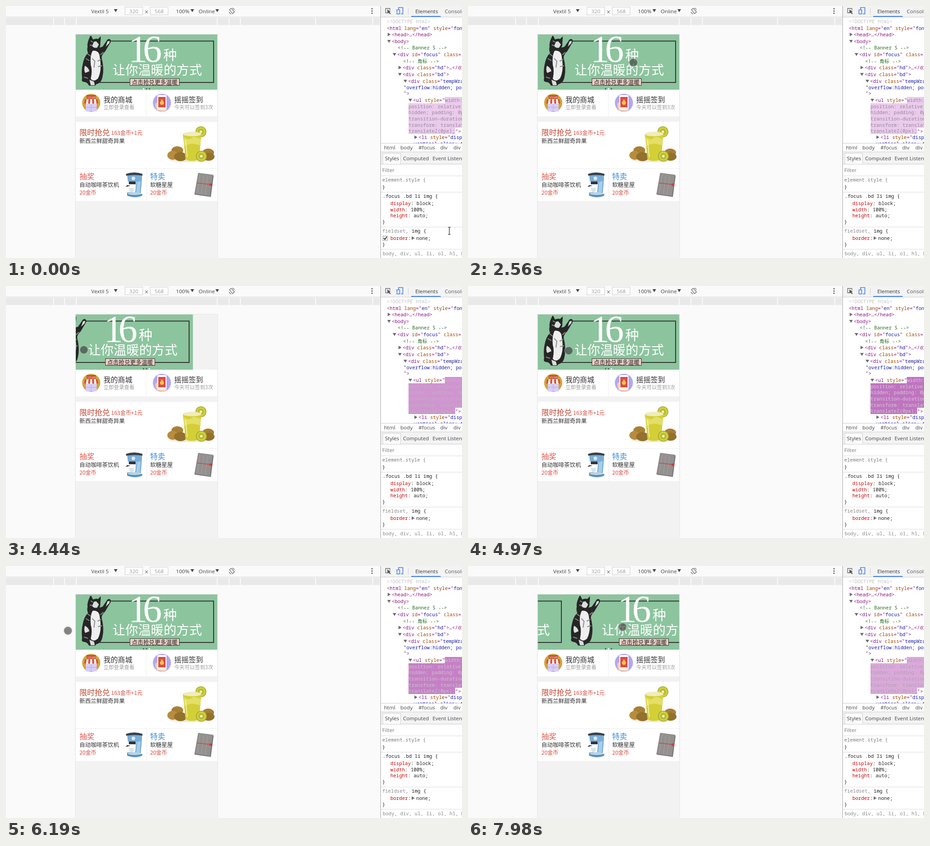
An HTML page that plays this animation: 1006 px wide and 557 px high, repeating every 8000 ms.

```html
<!DOCTYPE html>
<html lang="zh">
<head>
<meta charset="utf-8">
<title>Touch carousel in device mode</title>
<style>
html, body { margin: 0; width: 100%; height: 100%; overflow: hidden; background: #fafafa; }
svg { display: block; width: 100vw; height: 100vh; }
text { white-space: pre; }
.ui { font: 11.6px "Open Sans", "Noto Sans", sans-serif; }
.code { font: 10.7px "Noto Sans Mono", "Noto Sans CJK SC", monospace; }
.page { font-family: "Noto Sans CJK SC", "Noto Sans CJK", sans-serif; font-weight: 300; }
.val { fill: #1a1aa6; }
.attr { fill: #994500; }
</style>
</head>
<body>
<svg id="stage" viewBox="0 0 1006 557"></svg>
<script>
const esc = s => s.replace(/&/g, '&amp;').replace(/</g, '&lt;');
const rect = (x, y, w, h, fill, more = '') =>
  `<rect x="${x}" y="${y}" width="${w}" height="${h}" fill="${fill}" ${more}/>`;
const path = (d, fill, more = '') => `<path d="${d}" fill="${fill}" ${more}/>`;
const line = (d, color, width = 1) => path(d, 'none', `stroke="${color}" stroke-width="${width}"`);
const disc = (x, y, r, fill, more = '') => `<circle cx="${x}" cy="${y}" r="${r}" fill="${fill}" ${more}/>`;
const oval = (x, y, rx, ry, fill) => `<ellipse cx="${x}" cy="${y}" rx="${rx}" ry="${ry}" fill="${fill}"/>`;
const text = (cls, x, y, fill, s, more = '') =>
  `<text class="${cls}" x="${x}" y="${y}" fill="${fill}" ${more}>${esc(s)}</text>`;
const ui = (x, y, s, fill = '#444') => text('ui', x, y, fill, s);
const code = (x, y, s, fill = '#222', more) => text('code', x, y, fill, s, more);
const cn = (x, y, size, fill, s, more = '') => text('page', x, y, fill, s, `font-size="${size}" ${more}`);
const down = (x, y, fill = '#6e6e6e') => path(`M${x} ${y}h8l-4 6.5z`, fill);
const right = (x, y) => path(`M${x} ${y}v8l6.5 -4z`, '#6e6e6e');

// Markup line with coloured attribute names and values
const markup = (x, y, s) => {
  const body = esc(s).replace(/"([^"]*)("|$)| (\w+)(?==)/g, (m, value, end, name) =>
    name ? ` <tspan class="attr">${name}</tspan>` : `"<tspan class="val">${value}</tspan>${end}`);
  return `<text class="code" x="${x}" y="${y}" fill="#881280">${body}</text>`;
};
// CSS declaration
const rule = (y, name, value) =>
  `<text class="code" x="848" y="${y}" fill="#222"><tspan fill="#c80000">${name}</tspan>${value}</text>`;

function toolbar() {
  const cuts = [0, 106, 130, 156, 467, 493, 518, 684, 810, 827];
  return rect(0, 0, 826, 557, '#fafafa') + line('M0 24.5H826', '#d4d4d4') +
    cuts.slice(1).map((c, i) => rect(cuts[i], 26, c - cuts[i] - 2, 16, '#e9e9e9')).join('') +
    ui(188, 16, 'Vextil 5') + down(238, 7, '#444') +
    rect(262.5, 2.5, 39, 17, '#fff', 'stroke="#ccc"') + ui(272, 16, '320', '#999') +
    line('M307 10l6 6m0 -6l-6 6', '#555') +
    rect(318.5, 2.5, 39, 17, '#fff', 'stroke="#ccc"') + ui(328, 16, '568', '#999') +
    ui(375, 16, '100%') + down(407, 7, '#444') + ui(425, 16, 'Online') + down(462, 7, '#444') +
    line('M493 8l4 -3 7 8 -4 4zM492 13a6.5 6.5 0 0 0 5 4.500M499 4.500a6.500 6.500 0 0 1 5 4', '#666', 1.2) +
    [6, 11, 16].map(y => disc(807.500, y, 1.500, '#555')).join('');
}

function devtools() {
  return rect(826, 0, 180, 557, '#fff') + rect(826, 0, 180, 24, '#f3f3f3') + line('M826 24.5H1006', '#ccc') +
    line('M847 15H837.500V5.500H847V9', '#666', 1.300) + path('M841 8l8 4 -3 1 3 4 -2 1 -3 -4 -2 2z', '#555') +
    line('M866 8V3.500H875.500V17.500H871', '#3b78e7', 1.500) + rect(862.500, 8.500, 6, 9, '#fff', 'stroke="#3b78e7" stroke-width="1.5"') +
    line('M887.5 4V19', '#ccc') + ui(903, 16, 'Elements', '#333') + rect(894, 22, 65, 2, '#4285f4') + ui(968, 16, 'Console', '#555') +
    code(840, 38, '<!DOCTYPE html>', '#c0c0c0') +
    markup(840, 53, '<html lang="en" style="font') +
    right(842, 59) + markup(851, 67, '<head>…</head>') +
    down(841, 75) + markup(851, 82, '<body>') +
    code(864, 96, '<!-- Banner S -->', '#236e25') +
    down(853, 104) + markup(863, 111, '<div id="focus" class="') +
    code(876, 126, '<!-- 角标 -->', '#236e25') +
    right(866, 132) + markup(875, 140, '<div class="hd">…</div>') +
    down(865, 148) + markup(875, 155, '<div class="bd">') +
    down(877, 163) + markup(887, 170, '<div class="tempWrap') +
    code(877, 184, '"overflow:hidden; po', '#1a1aa6') + code(877, 197, '">', '#881280') +
    down(888, 205) + markup(898, 212, '<ul style="') +
    path('M968 201H1006V269H991V283H888V215H968z', '#fff', 'id="flash"') +
    '<g id="value">' + code(968.500, 212, 'width:') +
    ['position: relative;', 'hidden; padding: 0px', 'transition-duration:', 'transform: translate', 'translateZ(0px);']
      .map((s, i) => code(888, 225.500 + i * 13.700, s)).join('') + '</g>' +
    code(991, 280.500, '">', '#881280') +
    right(901, 286) + markup(910, 294, '<li style="display') + code(900, 308, 'vertical-align: top', '#1a1aa6') +
    rect(827, 303, 179, 20, '#fff') + line('M827 303.5H1006M827 322.5H1006', '#ccc') +
    ui(834, 317, 'html') + ui(870, 317, 'body') + ui(910, 317, '#focus') + ui(958, 317, 'div') + ui(987, 317, 'div') +
    rect(827, 323, 179, 26, '#f3f3f3') + line('M827 349.5H1006', '#ccc') +
    rect(831.500, 325.500, 39, 24, '#fff', 'stroke="#ccc"') + ui(836, 341, 'Styles', '#333') +
    ui(876, 341, 'Computed') + ui(941, 341, 'Event Listeners') + ui(830, 367, 'Filter', '#777') +
    line('M827 375.5H1006M827 411.5H1006M827 488.5H1006M827 537.5H1006', '#ddd') +
    code(830, 388, 'element.style {', '#777') + code(830, 404, '}') +
    code(831, 424, '.focus .bd li img {') +
    rule(440, 'display', ': block;') + rule(454, 'width', ': 100%;') + rule(467, 'height', ': auto;') + code(830, 481, '}') +
    code(830, 501, 'fieldset,', '#888') + code(895, 501, 'img {') +
    '<g id="check">' + rect(831.500, 508.500, 10, 10, '#fff', 'stroke="#999"') + line('M833 513l3 3 4 -6', '#333', 2) + '</g>' +
    rule(517, 'border', ':') + right(895, 509) + code(905, 517, 'none;') + code(830, 531, '}') +
    code(831, 551, 'body, div, ul, li, ol, h1, h2', '#888') + line('M826.5 0V557', '#a3a3a3');
}

function slide() {
  const cat = path('M188 66l4 8q7 -3 11 -1l6 -6q0 9 -1 14q1 6 -2 11l7 -2l9 -13q3 -6 8 -3q3 4 -1 9l-10 17q-8 8 -8 14q6 25 2 42q-2 14 -14 17l-2 3h-14q-4 -8 -10 -8q-8 -1 -5 -8q-2 -18 1 -30q3 -18 12 -26q-3 -8 -1 -14q-2 -8 6 -24z', '#262626') +
    path('M191 99q15 -2 16 15q5 28 -4 46q-9 9 -16 1q4 -18 0 -31q-2 -20 4 -31z', '#eee') +
    path('M194 79l5 -1 6 7 -4 7q-7 2 -11 -4zM174 132q8 4 10 12l-9 4q-4 -6 -1 -16zM184 163l10 4 2 8h-9zM224 78l5 -1 -1 5 -8 8z', '#ddd') +
    line('M187 77l5 3M185 86l6 2M180 106l7 5M176 116l8 5M208 108l7 -6M172 157l9 3M202 122l8 -4M203 134l9 -2M190 116l6 6 -2 14', '#8b8b8b', 2);
  return rect(154, 63, 312.500, 122, '#8cc49e') + line('M222 77.500H458V169H204', '#333', 2) + cat +
    text('num', 270, 124, '#fff', '16', 'font-family="Liberation Serif,serif" font-size="84" letter-spacing="-10"') +
    cn(347, 119, 30, '#fff', '种') + cn(235, 152, 28.200, '#fff', '让你温暖的方式', 'font-weight="400"') +
    rect(273.500, 160.500, 109, 15, '#efcfc6', 'stroke="#333"') +
    cn(277.500, 172.500, 12.600, '#222', '点击抢兑更多温暖', 'style="font-weight:500"');
}

function shopIcon() {
  const stripes = [0, 1, 2, 3, 4, 5, 6].map(i => path(`M${174 + i * 4} 206h4l${(i - 3) / 2} 8q-2 5 -4 0z`, i % 2 ? '#fff' : '#dd5146')).join('');
  return disc(188, 214, 20, '#d2a437') + rect(176, 214, 24, 19, '#d8cdf6') + line('M188 217V233M176 224H200', '#b6a6e0') +
    rect(178, 197, 20, 8, '#c7473c') + text('ui', 179.500, 203.500, '#fff', 'STORE', 'style="font-size:6px"') + stripes;
}

function phoneIcon() {
  return disc(344, 214, 20, '#b2a8ec') + path('M329 217q4 -7 9 -3V232q-7 0 -9 -15zM338 222h16v11q-9 2 -16 -1z', '#f6cfb5') +
    rect(334, 197, 20, 32, '#fff', 'rx="2"') + rect(336, 201, 16, 23, '#dc4b43') + disc(344, 214, 4.500, '#f3c34d') +
    path('M341 207h6l-3 4z', '#f3c34d');
}

function juice() {
  const slice = (x, y, r) => disc(x, y, r, '#a9a51f') + disc(x, y, r - 1.500, '#cfd044') + disc(x, y, r * .55, '#b3ba2a') + disc(x, y, r * .25, '#f1efb5');
  return oval(408, 341, 48, 4, '#eee9dc') + slice(430, 278, 12) +
    oval(378, 319, 13, 9, '#a78035') + oval(368, 330, 12, 10, '#b88c3e') + oval(385, 333, 14, 10, '#94712c') +
    oval(446, 324, 13, 9, '#a78035') + oval(447, 333, 13, 9, '#94712c') +
    path('M390 282H431L426 339Q409 346 396 339z', '#d3cf36') + path('M392 290q12 8 17 2t20 2l-1 14q-20 -8 -35 2z', '#e4df68') +
    oval(410.500, 283, 20.500, 5, '#efecbd') + line('M396 296l4 38', '#f1efa5', 2) + slice(431, 332, 12);
}

function machine() {
  return path('M267 372q17 -5 33 0v11l-3 33 4 3q-16 8 -34 0v-7h18l2 -24h-18z', '#79add6') +
    path('M265 371q18 -6 36 0v4q-18 -3 -36 0z', '#35424e') + path('M271 388h15v6h-15zM267 396l-3 4 11 -3z', '#2f353b') +
    disc(281, 381, 4, '#dfe9ef') + path('M271 402h12l-2 10h-8z', '#dbe5eb') + path('M289 389l8 -2 -2 27 -8 2z', '#a9cee9') +
    oval(284, 417, 17, 4, '#4e88b6') + oval(284, 415, 15, 3, '#b9d3e4');
}

function notebook() {
  return path('M424 369l32 4q2 1 2 3l-6 46 -35 -5q-2 -1 -1 -3z', '#777') + path('M425 369l31 4 -6 47 -33 -5z', '#94908f') +
    line('M428 373l-6 40M436 375l-5 41M445 376l-6 42', '#a8a4a3') + line('M421 391l34 4', '#c4473f', 1.500) + disc(452, 395, 3, '#d23a34');
}

function page() {
  const red = '#d8463b';
  return rect(153, 62.500, 314, 500, '#f2f2f2', 'stroke="#e4e4e4"') +
    `<clipPath id="view"><rect x="154" y="63" width="312" height="122"/></clipPath>
    <defs><g id="slide">${slide()}</g></defs>
    <g clip-path="url(#view)"><g id="strip">${[0, 312, 624].map(x => `<use href="#slide" x="${x}"/>`).join('')}</g></g>` +
    [303.500, 310, 316.500].map(x => disc(x, 183, 1.600, '#555', 'class="dot"')).join('') +
    rect(154, 185, 312, 59, '#fff') + line('M309.5 185V244', '#eee') + shopIcon() + phoneIcon() +
    cn(215, 213, 15.900, '#333', '我的商城') + cn(215, 228, 11.400, '#999', '立即登录查看') +
    cn(371, 213, 15.900, '#333', '摇摇签到') + cn(371, 228, 11.400, '#999', '今天可以签到3次') +
    rect(154, 256, 312, 175, '#fff') + line('M154 359.5H466M310.5 360V431', '#ececec') +
    cn(162, 286, 16.800, '#c0432f', '限时抢兑') + cn(232, 285, 12, red, '163金币+1元') + cn(162, 302.500, 12.500, '#333', '新西兰鲜甜奇异果') +
    cn(162, 383, 16.500, '#e2574c', '抽奖') + cn(162, 400, 12.500, '#333', '自动咖啡茶饮机') + cn(162, 417, 12, red, '20金币') +
    cn(318, 383, 16.500, '#3d8be0', '特卖') + cn(318, 400, 12.500, '#333', '软糖星屋') + cn(318, 417, 12, red, '20金币') +
    juice() + machine() + notebook();
}

const pointers = `<g id="beam">${line('M-3 -8H-1L0 -7 1 -8H3M0 -7V7M-3 8H-1L0 7 1 8H3', '#222', 1.200)}</g>
  <g id="arrow">${path('M0 0V16L4 12.500 6.500 18.500 9 17.500 6.500 11.500H11.500z', '#fff', 'stroke="#222"')}</g>
  <g id="touch">${disc(0, 0, 9, 'rgba(50,50,50,.6)', 'stroke="rgba(205,212,205,.4)" stroke-width="2"')}</g>`;

const $ = id => document.getElementById(id);
$('stage').innerHTML = toolbar() + page() + devtools() + pointers;
const dots = document.querySelectorAll('.dot');

// [time, value, ...]
const stripKeys = [[0, 0], [1500, 0], [1850, -148], [2050, -312], [3050, -312], [3520, -503], [3610, -559], [3720, -624],
  [4060, -624], [4440, -678], [4580, -688], [4750, -688], [4950, -624], [5120, -624], [5450, -672], [5610, -672],
  [5850, -719], [5920, -719], [6120, -624], [6620, -624], [6950, -491], [7020, -468], [7230, -312], [7560, -312], [7980, -252]];
const pointerKeys = [[0, 978, 497], [390, 978, 497], [530, 954, 480], [700, 954, 480], [900, 706, 66], [1260, 706, 66],
  [1390, 560, 17], [1500, 430, 105], [1850, 282, 112], [2120, 282, 112], [2340, 588, 31], [2520, 365, 125], [2810, 365, 125],
  [3050, 400, 125], [3520, 209, 125], [3690, 209, 125], [4060, 307, 138], [4440, 172, 141], [4580, 147, 143], [4750, 147, 143],
  [5120, 273, 143], [5450, 153, 143], [5610, 153, 143], [5850, 35, 143], [5920, 35, 143], [6360, 200, 143], [6620, 219, 143],
  [6950, 352, 143], [7020, 375, 143], [7270, 375, 143], [7560, 281, 138], [7980, 341, 135]];
const flashes = [1430, 3050, 3530, 4080, 4750, 5640, 5920, 6710, 7020, 7530];

const clamp = v => Math.min(1, Math.max(0, v));
const mix = (a, b, k) => a.map((v, i) => v + (b[i] - v) * k);
const rgb = c => `rgb(${c.map(Math.round)})`;
function at(keys, t) {
  const i = keys.findIndex(k => k[0] > t);
  if (i < 0) return keys[keys.length - 1].slice(1);
  const [a, b] = [keys[i - 1], keys[i]];
  return mix(a, b, (t - a[0]) / (b[0] - a[0])).slice(1);
}

function draw(t) {
  $('strip').setAttribute('transform', `translate(${at(stripKeys, t)[0]} 0)`);
  const active = t < 1850 ? 0 : t < 3520 ? 1 : t < 7020 ? 2 : 1;
  dots.forEach((d, i) => d.setAttribute('fill', i === active ? '#fff' : '#555'));

  const start = flashes.filter(f => f <= t).pop() ?? -600;
  const age = clamp((t - start) / 600);
  const gone = start < 0 ? clamp((t - 390) / 140) : 0;
  const back = mix([166, 66, 165], [235, 203, 236], age);
  const ink = mix([250, 240, 250], [150, 135, 155], age);
  $('flash').setAttribute('fill', rgb(mix(back, [255, 255, 255], gone)));
  for (const line of $('value').children) line.setAttribute('fill', rgb(mix(ink, [26, 26, 166], gone)));
  $('check').style.display = t < 460 ? '' : 'none';

  const [x, y] = at(pointerKeys, t);
  const kind = t < 460 ? 'beam' : x < 468 && y > 63 ? 'touch' : 'arrow';
  for (const id of ['beam', 'arrow', 'touch']) {
    $(id).style.display = id === kind ? '' : 'none';
    $(id).setAttribute('transform', `translate(${x} ${y})`);
  }
}

const begin = performance.now();
function tick() {
  draw((performance.now() - begin) % 8000);
  requestAnimationFrame(tick);
}
tick();
</script>
</body>
</html>
```
